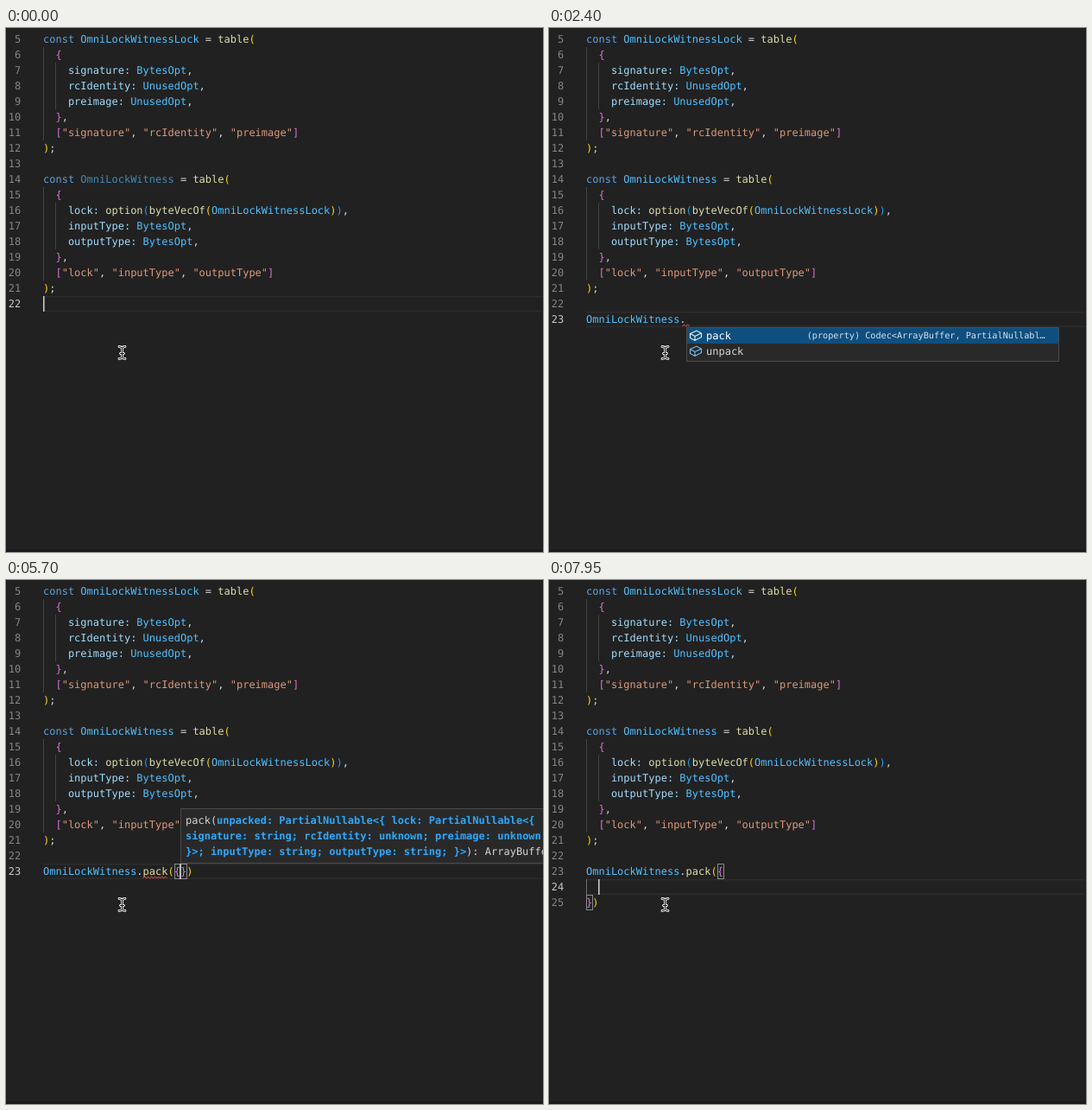
Write an HTML page with a canvas that moves like this. It is 622 by 606 pixels and loops after 8000 ms.

```html
<!DOCTYPE html>
<html lang="en">
<head>
<meta charset="utf-8">
<title>Typed codec in an editor</title>
<style>
html, body { margin: 0; width: 100%; height: 100%; overflow: hidden; background: #212121; }
canvas { display: block; }
</style>
</head>
<body>
<canvas id="stage" width="622" height="606"></canvas>
<script>
const ctx = document.getElementById('stage').getContext('2d');
const LOOP = 8000, LEFT = 43, ADVANCE = 7.224, ROW = 18, FIRST_LINE = 5;
const MONO = '"DejaVu Sans Mono", monospace';
const BRACKETS = ['#ffd700', '#da70d6', '#179fff'];
const TEXT = '#d4d4d4', LIGHT = '#9fdcfd', CONSTANT = '#4fc1ff', ACCENT = '#2aaaff';

const LISTING = `const OmniLockWitnessLock = table(
  {
    signature: BytesOpt,
    rcIdentity: UnusedOpt,
    preimage: UnusedOpt,
  },
  ["signature", "rcIdentity", "preimage"]
);

const OmniLockWitness = table(
  {
    lock: option(byteVecOf(OmniLockWitnessLock)),
    inputType: BytesOpt,
    outputType: BytesOpt,
  },
  ["lock", "inputType", "outputType"]
);
`;

// Text added below the listing; | marks the caret.
const TYPING = [
  [0, '|'], [300, '\n|'], [900, '\nO|'], [1050, '\nOm|'], [1350, '\nOmni|'],
  [1800, '\nOmniLockWitness|'], [1950, '\nOmniLockWitness.|'],
  [3150, '\nOmniLockWitness.p|'], [3300, '\nOmniLockWitness.pa|'],
  [3450, '\nOmniLockWitness.pac|'], [3600, '\nOmniLockWitness.pack|'],
  [3900, '\nOmniLockWitness.pack(|)'], [5550, '\nOmniLockWitness.pack({|})'],
  [6000, '\nOmniLockWitness.pack({\n  |\n})']
];
const CARET_OFF = [[2400, 3000], [4350, 4800], [5400, 5550], [6450, 6900], [7500, 7950]];
const HINT_AT = [[4050, 21, 23], [5700, 22, 23], [6150, 2, 24]];
const RESOLVED = 2400;

const HINT = [
  'pack(*unpacked: PartialNullable<{ lock: PartialNullable<{',
  '*signature: string; rcIdentity: unknown; preimage: unknown;',
  '*}>; inputType: string; outputType: string; }>*): ArrayBuffer'
];

const GLOBALS = {
  detail: 'const OmniLockWitness: ObjectCodec<{ lock: O…', fields: 0, old: 10, scroll: true,
  labels: ['OmniLockWit…', 'OmniLockWitnessLock', 'onsubmit', 'onemptied', 'onanimationcancel',
    'onanimationend', 'onanimationiteration', 'onanimationstart', 'ongamepaddisconnected',
    'ondevicemotion', 'onwebkitanimationend', 'onwebkitanimationiteration']
};
const MEMBERS = {
  detail: '(property) Codec<ArrayBuffer, PartialNullabl…', fields: 2, labels: ['pack', 'unpack']
};
const KEYS = {
  detail: '(property) inputType?: string | undefined', fields: 3, scroll: true,
  labels: ['inputType?', 'lock?', 'outputType?', 'AbortController', 'AbortSignal', 'byteVecOf',
    'BytesOpt', 'OmniLockWitness', 'OmniLockWitnessLock', 'option', 'table', 'UnusedOpt']
};
const SUGGEST = [[1050, 1800, GLOBALS], [1950, 3900, MEMBERS], [6600, 7050, KEYS]];

const IBEAM = new Path2D('M131 368.5q3 0 3.5 2q.5-2 3.5-2M134.5 370v11M131 382.5q3 0 3.5-2q.5 2 3.5 2M132.5 376.5h4');
const HAND = new Path2D('M131.2 378.5q-.6-2.5 1.2-2.5q1.2 0 1.7 1.5l1 3q1.7-1 2.3.5q1.8-.7 2.3.7q2.1-.2 2.5 1.8q.5 3-.5 5l-.4 2h-5.6q-1.5-2.6-4.2-4.7q0-1.8 2-1l.7.5z');
const CUBE = new Path2D('M.5 4.5L8 1L13.5 4V8.5L6 12.5L.5 9.5ZL6 7.5L13.5 4M6 7.5V12.5');

const colX = col => LEFT + col * ADVANCE;
const rowY = line => 4 + (line - FIRST_LINE) * ROW;
const latest = (list, t) => list.filter(step => step[0] <= t).pop();
const during = (list, t) => list.find(([from, to]) => t >= from && t < to);

function rect(x, y, w, h, color) {
  ctx.fillStyle = color;
  ctx.fillRect(x, y, w, h);
}

function outline(x, y, w, h, color) {
  ctx.strokeStyle = color;
  ctx.lineWidth = 1;
  ctx.strokeRect(x + .5, y + .5, w - 1, h - 1);
}

function write(text, x, baseline, color, bold = false, size = 12) {
  ctx.font = `${bold ? 'bold ' : ''}${size}px ${MONO}`;
  ctx.fillStyle = color;
  ctx.fillText(text, x, baseline);
}

function strokePath(path, color, width) {
  ctx.strokeStyle = color;
  ctx.lineWidth = width;
  ctx.stroke(path);
}

function squiggle(from, to) {
  const wave = new Path2D();
  for (let x = from, up = 0; x <= to; x += 2, up ^= 1) wave.lineTo(x, up ? 342.8 : 345.2);
  strokePath(wave, '#f14c4c', 1);
}

function drawCode(code, t) {
  let line = FIRST_LINE, col = 0, depth = 0;
  for (const match of code.matchAll(/"[^"]*"|\w+:?|[^\w"]/g)) {
    const word = match[0], next = code[match.index + word.length];
    if (word === '\n') { line++; col = 0; continue; }
    let color = TEXT;
    if (word[0] === '"') color = '#dd9878';
    else if (word === 'const') color = '#5ea0dc';
    else if (/[([{]/.test(word)) color = BRACKETS[depth++ % 3];
    else if (/[)\]}]/.test(word)) color = BRACKETS[--depth % 3];
    else if (next === '(') color = '#dcdcaa';
    else if (/^[A-Z]/.test(word)) color = line === 23 && t < RESOLVED ? LIGHT : CONSTANT;
    else if (/^\w/.test(word)) color = LIGHT;
    ctx.globalAlpha = line === 14 && word === 'OmniLockWitness' && t < RESOLVED ? .667 : 1;
    write(word, colX(col), rowY(line) + 13, color);
    ctx.globalAlpha = 1;
    col += word.length;
  }
  return line;
}

function drawGuides(caretLine) {
  const guide = (col, from, to, color = '#434343') =>
    rect(Math.floor(colX(col)), rowY(from), 1, (to - from + 1) * ROW, color);
  guide(0, 6, 11);
  guide(2, 7, 9);
  guide(0, 15, 20);
  guide(2, 16, 18);
  if (caretLine === 24) guide(0, 24, 24, '#707070');
}

function drawIcon(x, y, isField, color) {
  ctx.save();
  ctx.translate(x, y);
  if (isField) strokePath(CUBE, color, 1.1);
  else {
    strokePath(new Path2D('M3.5 2.5H.8V11.5H3.5M10.5 2.5H13.2V11.5H10.5'), color, 1.1);
    ctx.translate(3.3, 3.3);
    ctx.scale(.54, .54);
    strokePath(CUBE, color, 1.8);
  }
  ctx.restore();
}

// Letters of the label that match the query, in order, are bold and blue.
function writeMatch(label, query, x, baseline, color) {
  const lower = label.toLowerCase();
  const wanted = lower.startsWith(query) ? query : query.replace('mn', 'nm');
  let found = 0;
  [...label].forEach((char, i) => {
    const hit = lower[0] === wanted[0] && lower[i] === wanted[found];
    if (hit) found++;
    write(char, x + i * ADVANCE, baseline, hit ? ACCENT : color, hit);
  });
}

function drawSuggestions(list, col, line, query) {
  const x = Math.round(colX(col)), y = rowY(line) + ROW, height = list.labels.length * ROW + 4;
  rect(x, y, 432, height, '#292929');
  const hovered = y < 364 && x < 134 ? 1 : 0;
  list.labels.forEach((label, i) => {
    const top = y + 1 + i * ROW, selected = i === 0, old = i >= list.old;
    if (selected || i === hovered) rect(x + 1, top, 430, ROW, selected ? '#0f4f7f' : '#2e3132');
    drawIcon(x + 4, top + 2, i < list.fields, selected ? '#e8f2fa' : '#75beff');
    if (old) {
      write(label, x + 23, top + 13, '#929292');
      rect(x + 23, top + 9, label.length * ADVANCE, 1, '#929292');
    } else writeMatch(label, query, x + 23, top + 13, selected ? '#fff' : TEXT);
  });
  write(list.detail, x + 139.7, y + 13, '#d6e0e8', false, 10.2);
  if (list.scroll) rect(x + 421, y + 1, 10, 188, '#4f4f4f');
  outline(x, y, 432, height, '#4a4a4a');
}

function drawHint(col, line) {
  const x = Math.round(colX(col)), y = rowY(line) - 64;
  rect(x, y, 442, 64, '#292929');
  outline(x, y, 442, 64, '#4a4a4a');
  HINT.forEach((text, i) => {
    let at = x + 6;
    text.split('*').forEach((part, k) => {
      const bold = k % 2 === 1;
      write(part, at, y + 18 + i * ROW, bold ? ACCENT : TEXT, bold);
      at += part.length * ADVANCE;
    });
  });
}

function drawPair(t) {
  const box = (col, line) => {
    const x = Math.round(colX(col));
    rect(x, rowY(line), 8, ROW, 'rgba(0,100,0,.1)');
    outline(x, rowY(line), 8, ROW, '#888');
  };
  if (t < 3900) return;
  const inner = t >= 5550 ? 21 : 20;
  box(inner, 23);
  if (t < 6000) box(inner + 1, 23);
  else box(0, 25);
}

function drawPointer(isHand) {
  ctx.lineJoin = ctx.lineCap = 'round';
  if (isHand) {
    strokePath(HAND, '#111', 2);
    ctx.fillStyle = '#fff';
    ctx.fill(HAND);
    strokePath(new Path2D('M136 385v3M138 385v3M140 385v3'), '#222', .7);
  } else {
    strokePath(IBEAM, '#f2f2f2', 2.8);
    strokePath(IBEAM, '#161616', 1);
  }
  ctx.lineJoin = 'miter';
  ctx.lineCap = 'butt';
}

function draw(t) {
  const code = LISTING + latest(TYPING, t)[1];
  const before = code.split('|')[0].split('\n');
  const caretLine = FIRST_LINE + before.length - 1, caretCol = before.pop().length;
  const caretX = colX(caretCol), caretY = rowY(caretLine);

  rect(0, 0, 622, 606, '#212121');
  rect(LEFT, caretY, 579, 1.5, '#2d2d2d');
  rect(LEFT, caretY + ROW - 1.5, 579, 1.5, '#2d2d2d');
  rect(620, 0, 1, 603, '#1c1c1c');
  drawGuides(caretLine);
  drawPair(t);
  const lastLine = drawCode(code.replace('|', ''), t);
  ctx.textAlign = 'right';
  for (let n = FIRST_LINE; n <= lastLine; n++)
    write(n, 17.3, rowY(n) + 13, n === caretLine ? '#c8c8c8' : '#858585');
  ctx.textAlign = 'left';

  if (t >= RESOLVED && t < 3900) squiggle(caretX - 4, caretX + 4);
  if (t >= 4200 && t < 5850) squiggle(colX(16), colX(20));
  if (!during(CARET_OFF, t)) rect(Math.floor(caretX), caretY, 1.6, ROW, '#c8c8c8');

  const hint = latest(HINT_AT, t);
  if (hint && t < 7500) drawHint(hint[1], hint[2]);
  const suggest = during(SUGGEST, t);
  if (suggest) {
    const query = code.split('|')[0].match(/\w*$/)[0].toLowerCase();
    drawSuggestions(suggest[2], caretCol, caretLine, query);
  }
  rect(0, 603, 622, 3, '#1e181c');
  drawPointer(suggest && suggest[2] !== MEMBERS);
}

ctx.textRendering = 'geometricPrecision';
const start = performance.now();
function tick() {
  draw((performance.now() - start) % LOOP);
  requestAnimationFrame(tick);
}
tick();
</script>
</body>
</html>
```
